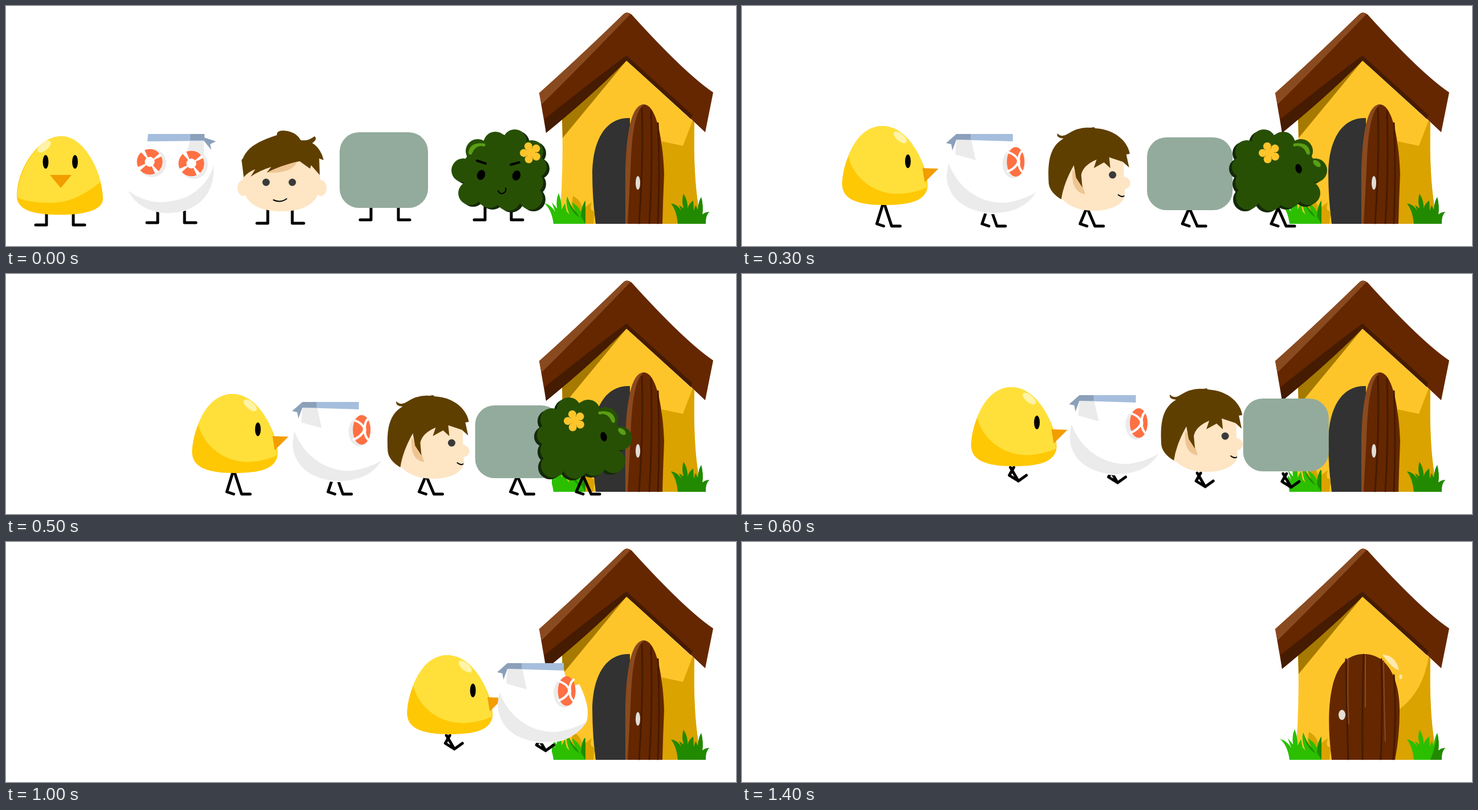
These frames come from a looping animation (1280 by 422 pixels, 1500 ms). An HTML page:

```html
<!DOCTYPE html>
<html lang="en">
<head>
<meta charset="utf-8">
<title>Walking home</title>
<style>
  html, body { margin: 0; width: 100%; height: 100%; overflow: hidden; background: #fff; }
  svg { display: block; width: 100vw; height: 100vh; }
  .line { fill: none; stroke: #000; stroke-width: 5; stroke-linecap: round; stroke-linejoin: round; }
  .thin { stroke-width: 2; }
</style>
</head>
<body>
<svg viewBox="0 0 1280 422">
  <defs>
    <clipPath id="trim"><path d="M957 345H1030V390H957Z"/></clipPath>
    <g id="scallops">
      <ellipse cx="864" cy="291" rx="64" ry="54"/>
      <circle cx="827" cy="255" r="21"/><circle cx="858" cy="242" r="21"/>
      <circle cx="892" cy="238" r="21"/><circle cx="922" cy="256" r="20"/>
      <circle cx="930" cy="283" r="18"/><circle cx="922" cy="310" r="20"/>
      <circle cx="920" cy="337" r="21"/><circle cx="881" cy="338" r="22"/>
      <circle cx="848" cy="333" r="22"/><circle cx="814" cy="329" r="21"/>
      <circle cx="802" cy="289" r="21"/>
    </g>
    <g id="bush">
      <use href="#scallops" x="5" y="3" fill="#14290a"/>
      <use href="#scallops" fill="#275005"/>
      <path d="M811 258Q813 238 840 242Q842 249 834 246Q822 246 817 260Q812 264 811 258Z" fill="#5a9e14"/>
    </g>
    <g id="flower" fill="#ffc52b">
      <circle r="8"/>
      <g id="petals"></g>
    </g>
    <g id="ring">
      <circle cx="4" cy="2" r="25" fill="#ececec"/>
      <circle r="23" fill="#fff"/>
      <circle r="15.5" fill="none" stroke="#ff7043" stroke-width="14" stroke-dasharray="19.35 5" transform="rotate(-25)"/>
    </g>
  </defs>

  <g id="house">
    <path d="M1088 96L1207 205Q1205 290 1213 345L1216 383H970Q978 290 975 199Z" fill="#fec52b"/>
    <path d="M975 199L1088 96 976 232Z" fill="#a67900"/>
    <g id="open">
      <path d="M1204 201L1187 246 1150 238V383H1216L1213 345Q1205 290 1207 205Z" fill="#daa300"/>
      <path d="M1034 383Q1028 340 1028 290C1030 230 1055 195 1094 197V383Z" fill="#323232"/>
      <path d="M1086 383V290C1088 210 1100 173 1119 173C1142 175 1152 240 1154 295Q1152 340 1151 383Z" fill="#652700"/>
      <path d="M1086 383V290C1088 210 1100 173 1119 173C1104 182 1097 220 1095 290L1090 383Z" fill="#8a4a20"/>
      <path class="line" style="stroke:#451b02;stroke-width:3" d="M1115 180Q1118 270 1110 382M1131 184Q1134 290 1128 382M1143 206Q1147 290 1143 382"/>
      <ellipse cx="1108" cy="311" rx="4" ry="12" fill="#e2ded4"/>
    </g>
    <g id="closed">
      <path d="M1204 201Q1195 262 1153 294L1145 383H1216L1213 345Q1205 290 1207 205Z" fill="#daa300"/>
      <path d="M1034 383C1022 290 1030 197 1090 197C1142 197 1154 260 1153 300Q1153 340 1145 383Z" fill="#652700"/>
      <path class="line" style="stroke:#451b02;stroke-width:3" d="M1059 206Q1060 290 1063 382M1090 198Q1087 290 1088 382M1121 206Q1124 290 1120 382M1143 234Q1148 300 1142 382"/>
      <path class="line" style="stroke:#8a4a20;stroke-width:2" d="M1063 205Q1061 270 1064 320M1093 199V290M1125 209Q1126 290 1128 350"/>
      <ellipse cx="1052" cy="304" rx="6" ry="9" fill="#e2ded4"/>
      <path d="M1123 198Q1146 199 1152 225Q1141 224 1123 198Z" fill="#ffe9ae"/>
      <ellipse cx="1155" cy="237" rx="2.5" ry="4" fill="#ffe9ae"/>
    </g>
    <path d="M1081 16Q1088 8 1097 15Q1190 118 1240 152L1226 222Q1150 150 1088 96Q1030 155 947 223L935 153Q1000 95 1081 16Z" fill="#652700"/>
    <path d="M1081 16Q1088 8 1095 14Q1010 103 939 173L935 153Q1000 95 1081 16Z" fill="#8a4a20"/>
    <path d="M944 199Q1030 130 1088 87L1203 191 1201 199 1088 96Q1030 155 947 223Z" fill="#451b02"/>
    <path d="M988 383L994 334Q1010 342 1010 358L1027 345Q1022 362 1032 360L1030 383Z" fill="#daa300"/>
    <g id="grass">
      <path d="M960 383Q957 358 943 346Q956 350 963 362L957 345 966 356Q964 340 969 329Q975 345 974 358L980 347 983 361 988 367Q980 347 984 335Q990 354 998 361L992 345Q1004 352 1008 362Q1010 350 1016 342V383Z" fill="#2bbf00"/>
      <path d="M984 335Q990 354 1000 363L1006 372Q989 362 984 335ZM1016 342V383L1008 370Q1010 350 1016 342Z" fill="#228a00"/>
    </g>
    <path id="tuft" d="M1178 383Q1176 360 1166 347Q1178 349 1184 360L1180 350 1188 356Q1184 342 1188 330Q1196 343 1195 356Q1197 348 1205 342L1206 360 1209 350 1213 358Q1214 343 1219 336Q1223 350 1221 367Q1224 363 1233 362Q1226 369 1227 383Z"/>
    <path d="M1207 383Q1216 360 1219 336Q1223 350 1221 367Q1224 363 1233 362Q1226 369 1227 383Z" fill="#228a00"/>
  </g>

  <g class="walker">
    <g class="front">
      <path d="M19 335C18 290 55 229 97 229C140 229 170 300 170 340C168 362 130 367 95 367C50 367 20 360 19 335Z" fill="#ffc805"/>
      <path d="M20 328C25 280 60 229 97 229C130 229 156 270 166 309C138 332 110 346 80 346C50 346 28 342 20 336Z" fill="#ffe03a"/>
      <ellipse rx="14" ry="7" transform="translate(67 247) rotate(-40)" fill="#fff3a8"/>
      <ellipse cx="69.500" cy="274" rx="5" ry="12"/><ellipse cx="121" cy="274" rx="5" ry="12"/>
      <path d="M77 297H115L96 320Z" fill="#f29d00"/>
    </g>
    <g class="side">
      <path d="M100 300C102 255 130 199 170 199C215 199 250 265 250 305C248 330 220 338 175 338C120 338 100 325 100 300Z" fill="#ffc805"/>
      <path d="M111 252C125 215 147 199 171 199C214 199 246 255 249 307C225 318 200 319 190 318C150 315 118 285 111 252Z" fill="#ffe03a"/>
      <ellipse rx="14" ry="6.500" transform="translate(202 219) rotate(40)" fill="#fff3a8"/>
      <ellipse cx="215.500" cy="261" rx="5" ry="12"/>
      <path d="M241 273L269 274 245 298Z" fill="#f29d00"/>
    </g>
  </g>

  <g class="walker">
    <g class="front">
      <path d="M323 236H347V254Q365 265 365 295C365 340 330 364 285 364C250 364 220 345 211 315Q225 270 255 255H318Z" fill="#fff"/>
      <path d="M222 330Q265 357 318 335Q355 315 364 280C368 335 330 364 285 364C250 364 225 347 214 325Z" fill="#ebebeb"/>
      <path d="M323 236H347V263H315Z" fill="#ebebeb"/>
      <path d="M249 225H348V237L248 238Z" fill="#a6bedd"/>
      <path d="M323 225H348V236H323ZM347 231L368 238 358 243 360 253 347 237Z" fill="#8ca0ba"/>
      <use href="#ring" x="252" y="274"/><use href="#ring" x="325" y="277"/>
    </g>
    <g class="side">
      <path d="M304 214L403 224 410 255 430 250Q450 290 443 315C425 345 395 354 365 354C320 352 287 325 287 285Q288 262 301 248Z" fill="#fff"/>
      <path d="M290 264C308 312 350 336 390 334Q420 330 443 316C425 345 395 352 365 352C320 350 287 325 287 285Z" fill="#ebebeb"/>
      <path d="M304 223H330L338 259 302 249Z" fill="#ebebeb"/>
      <path d="M304 213H403V226L304 223Z" fill="#a6bedd"/>
      <path d="M304 213H329V223H304L297 242 295 231 286 229Z" fill="#8ca0ba"/>
      <ellipse cx="404" cy="265" rx="19" ry="26" fill="#ebebeb"/>
      <ellipse cx="408" cy="262" rx="15.500" ry="26" fill="#ff7043"/>
      <path class="line" style="stroke:#fff;stroke-width:4" d="M395 245Q411 251 413 262Q407 274 394 279M413 262Q413 247 420 242M413 262Q413 274 421 281"/>
      <ellipse cx="413" cy="262" rx="3" ry="7" fill="#fff"/>
    </g>
  </g>

  <g class="walker">
    <g class="front">
      <g fill="#fee5c4">
        <ellipse cx="416" cy="320" rx="10" ry="14"/><ellipse cx="552" cy="320" rx="10" ry="14"/>
        <path d="M415 262H551V310C551 345 525 361 483 361C440 361 415 345 415 310Z"/>
      </g>
      <path d="M457 293Q485 279 510 275Q500 295 457 293Z" fill="#eec592"/>
      <path d="M413 271L416 267C424 247 445 237 475 227Q474 219 486 219Q508 220 517 236Q530 238 541 229Q547 234 537 241Q552 250 557 271L549 268 550 297 535 280 533 286 515 273Q485 279 457 293L465 283Q445 289 429 300L437 287Q424 292 417 301Z" fill="#5f3f00"/>
      <circle cx="456" cy="310" r="6.500" fill="#3a3a3a"/><circle cx="502" cy="310" r="6.500" fill="#3a3a3a"/>
      <path class="line thin" d="M469 341Q481 347 492 339"/>
    </g>
    <g class="side">
      <path d="M480 300C490 335 520 348 550 348C585 348 605 335 606 318Q604 312 606 310Q616 307 615 297Q612 290 604 288L603 250H500Z" fill="#fee5c4"/>
      <path d="M514 275Q510 315 536 319L530 300Z" fill="#eec592"/>
      <path d="M472 300C470 266 472 236 498 221Q485 220 487 212Q495 220 505 213Q525 200 545 202L552 201 553 203C592 205 612 230 614 248L608 249 613 272 602 262 578 254 580 273 569 263 551 273 556 258Q532 268 529 285L531 307 520 290 516 268Q498 300 494 328Q474 316 472 300Z" fill="#5f3f00"/>
      <circle cx="584" cy="285" r="6.500" fill="#3a3a3a"/>
      <path class="line thin" d="M594 320Q600 325 604 322"/>
    </g>
  </g>

  <g class="walker" fill="#93ab9c">
    <g class="front"><rect x="585" y="222" width="155" height="133" rx="34"/></g>
    <g class="side"><rect x="654" y="219" width="150" height="128" rx="34"/></g>
  </g>

  <g class="walker">
    <g class="front">
      <use href="#bush"/>
      <use href="#flower" x="920" y="258"/>
      <path class="line" style="stroke-width:4" d="M826 272L841 277M885 279L900 275"/>
      <ellipse rx="7" ry="9" transform="translate(833 297) rotate(20)"/>
      <ellipse rx="7" ry="9" transform="translate(895 298) rotate(20)"/>
      <path class="line thin" d="M863 325Q866 332 872 329Q878 327 876 320"/>
    </g>
    <g class="side">
      <use href="#bush" transform="translate(1771 -12) scale(-1 1)"/>
      <use href="#flower" x="889" y="246"/>
      <ellipse rx="5.500" ry="8.500" transform="translate(940 274) rotate(-15)"/>
      <ellipse rx="8" ry="4.500" transform="translate(972 265) rotate(40)" fill="#5a9e14"/>
    </g>
  </g>
</svg>
<script>
const FRAME = 100, COUNT = 15, BOB = 12, FLOOR = 387;
const $ = id => document.getElementById(id);
const show = (el, on) => el.style.display = on ? "" : "none";

// left/right: standing legs; foot: lowest point of the folded legs two steps in
const specs = [
  { left: 71, right: 118, base: 385, foot: [183, 364], speed: 75.4, last: 13 },
  { left: 266, right: 313, base: 381, foot: [371, 367], speed: 71.9, last: 11 },
  { left: 459, right: 502, base: 382, foot: [549, 374], speed: 65.8, last: 9 },
  { left: 640, right: 688, base: 376, foot: [738, 375], speed: 56.2, last: 7 },
  { left: 840, right: 886, base: 376, foot: [914, 375], speed: 36, last: 5 }
];

const svgEl = name => document.createElementNS("http://www.w3.org/2000/svg", name);

const standing = s =>
  `M${s.left} ${s.base - 24}V${s.base}h-19M${s.right} ${s.base - 24}V${s.base}h20`;
const folded = ([x, y]) =>
  `M${x - 14} ${y - 24}L${x} ${y}l14 -10M${x - 8} ${y - 24}l-8 14L${x} ${y}`;
const stride = ([x, y]) =>
  `M${x - 10} ${y - 20}L${x - 22} ${FLOOR - 4}l12 4M${x - 10} ${y - 20}L${x + 4} ${FLOOR}h15`;

for (let i = 0; i < 5; i++) {
  const petal = svgEl("circle");
  const angle = (i * 72 - 38) * Math.PI / 180;
  petal.setAttribute("cx", 12 * Math.cos(angle));
  petal.setAttribute("cy", 12 * Math.sin(angle));
  petal.setAttribute("r", 7);
  $("petals").append(petal);
}

const walkers = [...document.querySelectorAll(".walker")].map((el, i) => {
  const legs = svgEl("path");
  legs.setAttribute("class", "line");
  el.prepend(legs);
  return { ...specs[i], el, legs, front: el.querySelector(".front"), side: el.querySelector(".side") };
});

function draw(time) {
  const step = Math.floor(time / FRAME) % COUNT;
  const walking = step > 0, low = step % 2 === 1, home = step === COUNT - 1;
  for (const w of walkers) {
    show(w.el, step <= w.last);
    show(w.front, !walking);
    show(w.side, walking);
    const dx = walking ? (step - 2) * w.speed : 0;
    w.el.setAttribute("transform", `translate(${dx} 0)`);
    w.side.setAttribute("transform", `translate(0 ${low ? BOB : 0})`);
    w.legs.setAttribute("d", !walking ? standing(w) : low ? stride(w.foot) : folded(w.foot));
  }
  show($("open"), !home);
  show($("closed"), home);
  $("tuft").setAttribute("fill", home ? "#2bbf00" : "#228a00");
  $("grass").setAttribute("clip-path", step >= 5 && !home ? "url(#trim)" : "none");
}

const start = performance.now();
function tick() {
  draw(performance.now() - start);
  requestAnimationFrame(tick);
}
tick();
</script>
</body>
</html>
```
